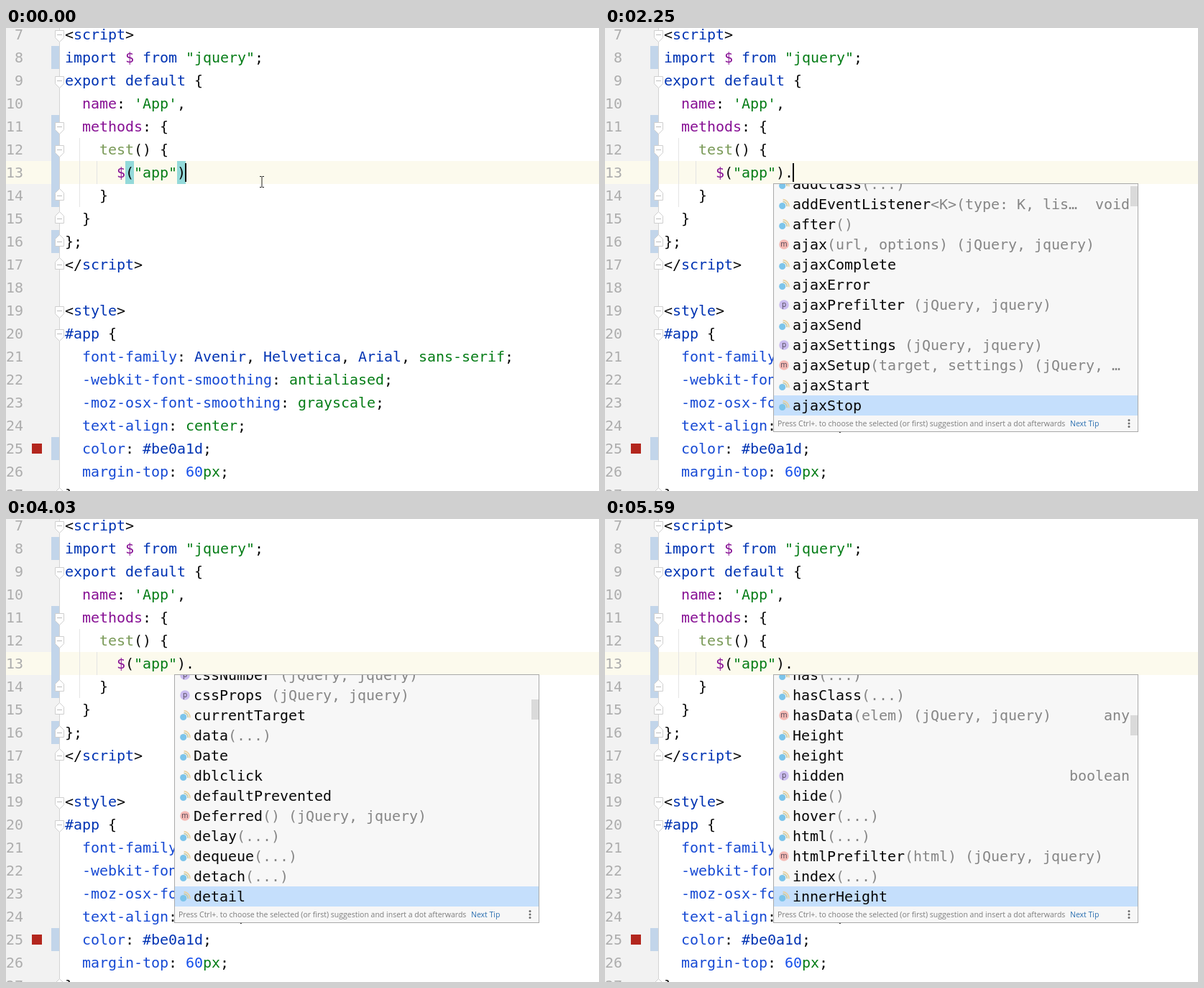
Recreate the animation shown at these times as an HTML page with a canvas. Size 825 by 644 pixels, loop 5.89 s.

```html
<!DOCTYPE html>
<html lang="en">
<head>
<meta charset="utf-8">
<title>Code completion</title>
<style>
html, body { margin: 0; height: 100%; overflow: hidden; background: #fff; }
canvas { display: block; }
</style>
</head>
<body>
<canvas width="825" height="644"></canvas>
<script>
const ctx = document.querySelector('canvas').getContext('2d');
const LOOP = 5890, LINE = 32, ROW = 28, CHAR = 12;
const MONO = '20px "DejaVu Sans Mono", monospace';
const TIP = '10.5px "Open Sans", sans-serif';

const COLORS = {
  k: '#080808', b: '#0033b3', g: '#067d17', p: '#871094',
  m: '#7a9a58', c: '#174ad4', n: '#1750eb'
};

// Each piece of a line starts with its colour key; pieces are split by ~.
const CODE = `k<~bscript~k>
bimport ~p$~b from ~g"jquery"~k;
bexport default ~k{
k  ~pname~k: ~g'App'~k,
k  ~pmethods~k: {
k    ~mtest~k() {
k      ~p$~k(~g"app"~k)
k    }
k  }
k};
k</~bscript~k>

k<~bstyle~k>
b#app ~k{
k  ~cfont-family~k: ~bAvenir~k, ~bHelvetica~k, ~bArial~k, ~gsans-serif~k;
k  ~c-webkit-font-smoothing~k: ~gantialiased~k;
k  ~c-moz-osx-font-smoothing~k: ~ggrayscale~k;
k  ~ctext-align~k: ~gcenter~k;
k  ~ccolor~k: ~b#be0a1d~k;
k  ~cmargin-top~k: ~n60~gpx~k;
k}`.split('\n');

// Optional icon letter, name, grey tail, |type; @ is the jQuery origin.
const ITEMS = `p accessKey|string;p accessKeyLabel|string;p active@|number;add(...);addBack(...);
addClass(...);addEventListener<K>(type: K, lis…|void;after();m ajax(url, options)@;ajaxComplete;
ajaxError;p ajaxPrefilter@;ajaxSend;p ajaxSettings@;m ajaxSetup(target, settings) (jQuery, …;
ajaxStart;ajaxStop;ajaxSuccess;p ajaxTransport@;altKey;animate(...);append(...);appendTo(...);
Array;async;attr(...);p attrHooks@;p autocapitalize|string;before();bind(...);blur;Boolean;border;
bubbles;button;buttons;cancelable;cancelBubble;change;char;charCode;checked;children(...);
className;m cleanData(elems)@;clearQueue(...);click;clientX;clientWidth;clientY;clone(...);
closest(...);code;colSpan;m contains(a, b)@|any;content;contentEditable;contents(...);contextmenu;
css(...);p cssHooks@;p cssNumber@;p cssProps@;currentTarget;data(...);Date;dblclick;
defaultPrevented;m Deferred()@;delay(...);dequeue(...);detach(...);detail;p dir|string;each(...);
p easing@;empty();Error;p escapeSelector(sel)@;p etag@;eventPhase;p expr@;fadeIn;fadeOut;
fadeTo(...);fadeToggle;filter(...);find(...);finish(...);first();focus;focusin;focusout;p fn@;
Function;p fx@;get(...);m getScript(url)@;m globalEval(code)@;m grep(array, fn)@;has(...);
hasClass(...);m hasData(elem)@|any;Height;height;p hidden|boolean;hide();hover(...);html(...);
m htmlPrefilter(html)@;index(...);innerHeight`.replace(/\n/g, '').replace(/@/g, ' (jQuery, jquery)')
  .split(';').map(s => s.match(/^(?:([pm]) )?(\w+)([^|]*)\|?(.*)$/).slice(1));

const lineTop = n => 25 + (n - 8) * LINE;

function rect(color, x, y, w, h) {
  ctx.fillStyle = color;
  ctx.fillRect(x, y, w, h);
}

function text(s, x, y, color, font = MONO, align = 'left') {
  ctx.font = font;
  ctx.letterSpacing = font === MONO ? '-0.041px' : '0px';
  ctx.textAlign = align;
  ctx.fillStyle = color;
  ctx.fillText(s, x, y);
}

function disc(color, x, y, r) {
  ctx.fillStyle = color;
  ctx.beginPath();
  ctx.arc(x, y, r, 0, 7);
  ctx.fill();
}

function foldMark(n, dir) {
  const y = lineTop(n) + 16.5 + dir;
  ctx.beginPath();
  ctx.moveTo(68.5, y - 7 * dir);
  ctx.lineTo(80.5, y - 7 * dir);
  ctx.lineTo(80.5, y + 3 * dir);
  ctx.lineTo(74.5, y + 9 * dir);
  ctx.lineTo(68.5, y + 3 * dir);
  ctx.closePath();
  ctx.fillStyle = '#fff';
  ctx.fill();
  ctx.strokeStyle = '#cfcfcf';
  ctx.lineWidth = 1;
  ctx.stroke();
  rect('#bdbdbd', 71, Math.floor(y - dir), 7, 1);
}

function drawEditor(typed) {
  rect('#fff', 0, 0, 825, 644);
  rect('#f2f2f2', 0, 0, 74, 644);
  rect('#fcfaed', 0, lineTop(13), 825, LINE);
  for (const [from, count] of [[8, 1], [11, 4], [16, 1], [25, 1]])
    rect('#c2d5ea', 63, lineTop(from), 12, count * LINE);
  rect('#d4d4d4', 74, 0, 1, 644);
  rect('#e4e4e4', 102, lineTop(12), 1, 3 * LINE);
  rect('#e4e4e4', 126, lineTop(13), 1, LINE);
  for (const n of [7, 9, 11, 12, 19, 20]) foldMark(n, 1);
  for (const n of [14, 15, 16, 17, 27]) foldMark(n, -1);
  rect('#b3261e', 36, 578, 14, 14);
  if (!typed)
    for (const x of [166, 238]) rect('#93d9d9', x, lineTop(13), CHAR, LINE);

  CODE.forEach((line, i) => {
    const y = lineTop(i + 7) + 23;
    text(i + 7, 24, y, '#adadad', MONO, 'right');
    let x = 82;
    for (const piece of line.split('~')) {
      text(piece.slice(1), x, y, COLORS[piece[0]]);
      x += (piece.length - 1) * CHAR;
    }
  });
  if (typed) text('.', 250, lineTop(13) + 23, COLORS.k);
}

function drawIcon(kind, y) {
  if (kind) {
    disc(kind === 'p' ? '#cbbdf0' : '#f4b9b4', 249, y, 6.8);
    text(kind, 249, y + 3, '#4a4050', '10px "Open Sans", sans-serif', 'center');
    return;
  }
  ctx.lineWidth = 1.7;
  for (const [r, color] of [[6.2, '#c4c9a4'], [8.8, '#e9cf9c']]) {
    ctx.strokeStyle = color;
    ctx.beginPath();
    ctx.arc(247, y + 2.5, r, -1.5, 0.1);
    ctx.stroke();
  }
  disc('#7cc4ea', 246.7, y + 2.5, 4.6);
}

function drawPopup(selected) {
  const scroll = Math.max(0, (selected + 1) * ROW - 322);
  rect('#a9a9a9', 234, 216, 508, 346);
  rect('#f7f7f7', 235, 217, 506, 344);

  ctx.save();
  ctx.beginPath();
  ctx.rect(235, 217, 506, 322);
  ctx.clip();
  rect('#c5dffc', 235, 217 + selected * ROW - scroll, 506, ROW);
  const first = Math.floor(scroll / ROW);
  for (let i = first; i < Math.min(first + 13, ITEMS.length); i++) {
    const [kind, name, tail, type] = ITEMS[i], y = 217 + i * ROW - scroll;
    drawIcon(kind, y + 14);
    text(name, 261, y + 21, '#080808');
    text(tail, 261 + name.length * CHAR, y + 21, '#868686');
    text(type, 730, y + 21, '#868686', MONO, 'right');
  }
  rect('#dadada', 731, 217 + Math.round(scroll / 50), 10, ROW);
  ctx.restore();

  text('Press Ctrl+. to choose the selected (or first) suggestion and insert a dot afterwards',
    240, 554, '#7c7c7c', TIP);
  text('Next Tip', 647, 554, '#2a6fb0', TIP);
  for (const y of [545.5, 550, 554.5]) disc('#6e6e6e', 729, y, 1.5);
}

function drawPointer() {
  rect('#222', 355.5, 207, 1, 14);
  for (const y of [206, 221]) {
    rect('#222', 353, y, 2.5, 1);
    rect('#222', 356.5, y, 2.5, 1);
  }
}

// Held arrow key: about 2.43 rows for each 77 ms screen update.
function selectedAt(t) {
  if (t < 1320) return 0;
  if (t < 1785) return 1;
  const step = Math.min(45, Math.floor((t - 1785) / 77.27));
  return Math.round(4 + (step - 1) * 107 / 44);
}

function caretOn(t) {
  if (t < 450) return t < 150;
  return t < 1640 || (t >= 2090 && Math.floor((t - 2090) / 500) % 2 === 0);
}

function draw(now) {
  const t = now % LOOP, typed = t >= 450;
  drawEditor(typed);
  if (caretOn(t)) rect('#000', typed ? 261 : 249, 188, 2, 26);
  if (!typed) drawPointer();
  if (t >= 700) drawPopup(selectedAt(t));
  requestAnimationFrame(draw);
}
requestAnimationFrame(draw);
</script>
</body>
</html>
```
